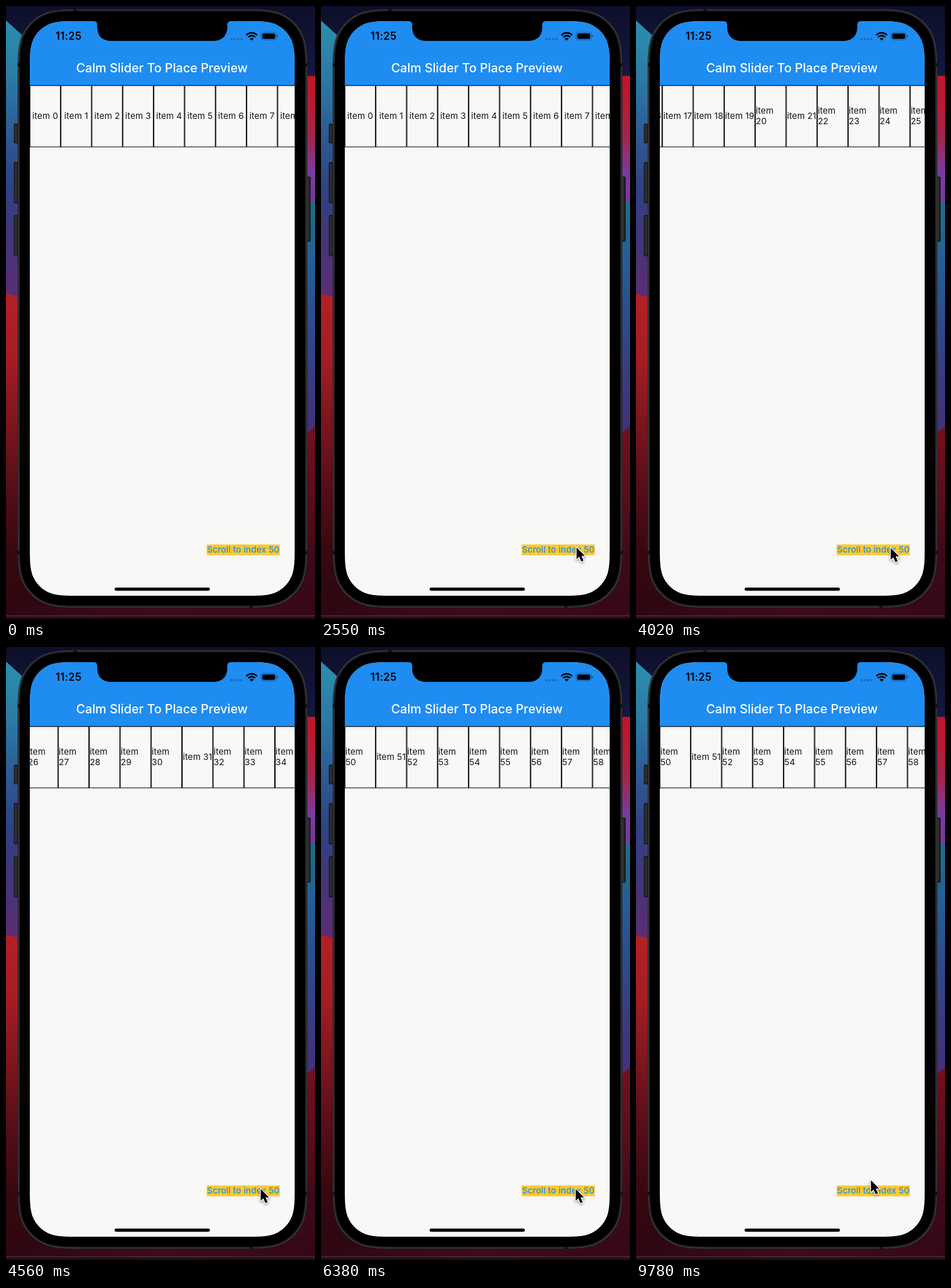
An HTML page with a canvas that plays this animation: 532 by 1053 pixels, repeating every 9.8 s.

```html
<!DOCTYPE html>
<html lang="en">
<head>
<meta charset="utf-8">
<title>List scroll demo</title>
<style>
html, body { margin: 0; width: 100%; height: 100%; overflow: hidden; background: #10112c; }
canvas { display: block; width: 532px; height: 1053px; }
</style>
</head>
<body>
<canvas id="stage" width="532" height="1053"></canvas>
<script>
const W = 532, H = 1053, LOOP = 9800;
const SCREEN = { x: 41, y: 26, w: 456, h: 987, r: 57 };
const ITEM_W = 53.33, ITEM_H = 106, LIST_Y = 136;
const INK = '#141414', BLUE = '#1e8cf1', PAPER = '#f8f8f6';
const FONT = 'Inter, Roboto, sans-serif';
const ctx = document.getElementById('stage').getContext('2d');

// [time, value...] keys
const SCROLL = [[3099, 0], [4560, 1391], [5260, 2102.2], [5853, 2666.5]];
const POINTER = [[560, 500, 1062], [1130, 440, 930], [2700, 440, 930], [2900, 438.5, 931],
  [9480, 438.5, 931], [9780, 404.5, 916]];

const clamp = (v, a = 0, b = 1) => Math.min(b, Math.max(a, v));
const ramp = (t, a, b) => clamp((t - a) / (b - a));
const smooth = u => u * u * (3 - 2 * u);

function keyed(keys, t, col, ease = u => u) {
  if (t <= keys[0][0]) return keys[0][col];
  for (let i = 1; i < keys.length; i++) {
    const a = keys[i - 1], b = keys[i];
    if (t <= b[0]) return a[col] + (b[col] - a[col]) * ease(ramp(t, a[0], b[0]));
  }
  return keys[keys.length - 1][col];
}

function sampled(t) {
  const phase = t < 3270 ? 30 : 80;
  const r = (((t - phase) % 140) + 140) % 140;
  const step = r < 20 ? 0 : r < 40 ? 1 : 2;
  return t - r + step * 140 / 3;
}

function box(x, y, w, h, r, fill) {
  ctx.beginPath();
  ctx.roundRect(x, y, w, h, r);
  ctx.fillStyle = fill;
  ctx.fill();
}

// Rectangle with continuous-curvature corners
function squircle(x, y, w, h, r) {
  const path = new Path2D();
  const corner = (cx, cy, ux, uy, vx, vy) => {
    const p = (a, b) => [cx + r * (a * ux + b * vx), cy + r * (a * uy + b * vy)];
    path.lineTo(...p(1.529, 0));
    path.bezierCurveTo(...p(1.088, 0), ...p(0.868, 0), ...p(0.631, 0.075));
    path.bezierCurveTo(...p(0.373, 0.169), ...p(0.169, 0.373), ...p(0.075, 0.631));
    path.bezierCurveTo(...p(0, 0.868), ...p(0, 1.088), ...p(0, 1.529));
  };
  corner(x, y, 0, 1, 1, 0);
  corner(x + w, y, -1, 0, 0, 1);
  corner(x + w, y + h, 0, -1, -1, 0);
  corner(x, y + h, 1, 0, 0, -1);
  path.closePath();
  return path;
}

function poly(points, fill) {
  ctx.beginPath();
  points.forEach(([x, y]) => ctx.lineTo(x, y));
  ctx.closePath();
  ctx.fillStyle = fill;
  ctx.fill();
}

function gradient(line, ...stops) {
  const g = ctx.createLinearGradient(...line);
  stops.forEach((c, i) => g.addColorStop(i / (stops.length - 1), c));
  return g;
}
const vertical = (y0, y1, ...stops) => gradient([0, y0, 0, y1], ...stops);

function text(str, x, y, size, weight, fill, align = 'left', spacing = 0) {
  ctx.font = `${weight} ${size}px ${FONT}`;
  ctx.letterSpacing = spacing + 'px';
  ctx.textAlign = align;
  ctx.fillStyle = fill;
  ctx.fillText(str, x, y);
}

function drawBackdrop() {
  ctx.fillStyle = vertical(0, 120, '#0d0f2a', '#151840');
  ctx.fillRect(0, 0, W, H);
  poly([[0, 25], [30, 52], [266, 300], [266, 620], [0, 620]],
    vertical(25, 500, '#2b8fae', '#2b7ba6', '#2d5c96', '#2f4283', '#443579', '#5d2c74'));
  poly([[0, 494], [30, 503], [266, 560], [266, H], [0, H]],
    vertical(494, 1046, '#b32024', '#a51d23', '#7d151d', '#560e18', '#38080f', '#2c0711'));
  ctx.fillStyle = vertical(120, 338, '#c21527', '#b81a35', '#a02650', '#7a3aa0', '#7b35a5');
  ctx.fillRect(266, 120, 266, 240);
  poly([[266, 352], [W, 337], [W, 800], [266, 800]],
    vertical(337, 735, '#1c6f86', '#235f96', '#2c4c8e', '#393b81', '#44307a'));
  poly([[266, 850], [515, 736], [W, 722], [W, H], [266, H]],
    vertical(722, 1046, '#74101e', '#5c0d1c', '#400a18', '#340816'));
  ctx.fillStyle = gradient([0, 0, W, 0], '#2e0712', '#400a19', '#360817');
  ctx.fillRect(0, 1030, W, 17);
  ctx.fillStyle = '#46424c';
  ctx.fillRect(0, 1047, W, 1.5);
  ctx.fillStyle = '#250a18';
  ctx.fillRect(0, 1048.5, W, 5);
}

function drawBody() {
  const key = (x, y, h) => {
    box(x, y, 8, h, 2, '#191a1c');
    box(x + 2, y + 2, 3, h - 4, 1, '#303235');
  };
  key(13.5, 202, 34);
  key(13.5, 268, 71);
  key(13.5, 359, 71);
  key(516.5, 293, 112);
  const rings = [[0, '#17181a'], [0.7, '#444547'], [1.8, '#202123'], [4, '#000']];
  rings.forEach(([inset, fill]) => {
    ctx.fillStyle = fill;
    ctx.fill(squircle(20 + inset, 5 + inset, 499 - 2 * inset, 1029 - 2 * inset, 78 - inset));
  });
  ctx.fillStyle = '#111';
  [98, 936].forEach(y => { ctx.fillRect(20, y, 4, 6); ctx.fillRect(515, y, 4, 6); });
  [[116, 5], [419, 1030]].forEach(([x, y]) => ctx.fillRect(x, y, 6, 4));
}

function drawHeader() {
  ctx.save();
  ctx.shadowColor = 'rgba(0,0,0,.3)';
  ctx.shadowBlur = 4;
  ctx.shadowOffsetY = 1;
  ctx.fillStyle = BLUE;
  ctx.fillRect(SCREEN.x - 10, SCREEN.y, SCREEN.w + 20, LIST_Y - SCREEN.y);
  ctx.restore();
  text('Calm Slider To Place Preview', 268.5, 113.6, 21.33, 500, '#fff', 'center');
}

function drawStatus() {
  text('11:25', 107.8, 58.4, 18, 600, '#000', 'center', 0.4);
  for (let i = 0; i < 4; i++) box(386.5 + i * 5.6, 55, 3.8, 3.8, 1.9, '#1868b5');
  // wireless fan
  ctx.save();
  ctx.beginPath();
  ctx.moveTo(423, 59.5);
  ctx.lineTo(409, 45.5);
  ctx.lineTo(409, 40);
  ctx.lineTo(437, 40);
  ctx.lineTo(437, 45.5);
  ctx.closePath();
  ctx.clip();
  ctx.strokeStyle = '#000';
  ctx.lineWidth = 2.7;
  [12.6, 8].forEach(r => {
    ctx.beginPath();
    ctx.arc(423, 58.8, r, 0, 7);
    ctx.stroke();
  });
  ctx.beginPath();
  ctx.arc(423, 58.8, 4.4, 0, 7);
  ctx.fillStyle = '#000';
  ctx.fill();
  ctx.restore();
  // battery
  ctx.beginPath();
  ctx.roundRect(439.3, 45.3, 26, 13, 4);
  ctx.strokeStyle = 'rgba(0,0,0,.38)';
  ctx.lineWidth = 1.1;
  ctx.stroke();
  box(441.2, 47.2, 22.2, 9.2, 2.3, '#000');
  box(466.6, 49.6, 1.7, 4.4, [0, 2, 2, 0], 'rgba(0,0,0,.45)');
}

function drawNotch() {
  ctx.beginPath();
  ctx.moveTo(151, 25);
  ctx.lineTo(151, 26);
  ctx.quadraticCurveTo(157, 26, 157, 32);
  ctx.lineTo(157, 36);
  ctx.bezierCurveTo(157, 51, 166, 60, 181, 60);
  ctx.lineTo(357, 60);
  ctx.bezierCurveTo(372, 60, 381, 51, 381, 36);
  ctx.lineTo(381, 32);
  ctx.quadraticCurveTo(381, 26, 387, 26);
  ctx.lineTo(387, 25);
  ctx.closePath();
  ctx.fillStyle = '#000';
  ctx.fill();
}

function drawList(offset) {
  const first = Math.max(0, Math.floor(offset / ITEM_W));
  const label = (str, x, y, align) => text(str, x, y, 14.93, 400, INK, align, 0.12);
  ctx.lineWidth = 1.1;
  for (let n = first; n < first + 10; n++) {
    const x = 40.8 + n * ITEM_W - offset;
    ctx.strokeStyle = '#000';
    ctx.strokeRect(x + 0.55, LIST_Y + 0.5, ITEM_W - 1.1, ITEM_H - 0.5);
    const oneLine = n < 20 || n % 10 === 1;
    if (oneLine) {
      label('item ' + n, x + ITEM_W / 2, 194.3, 'center');
    } else {
      label('item', x + 1.1, 185.3);
      label(n, x + 1.1, 203.3);
    }
  }
}

function drawButton(t) {
  const glow = ramp(t, 2950, 3010) * (1 - ramp(t, 3320, 3520));
  const ripple = ramp(t, 2950, 3010) * (1 - ramp(t, 3330, 3560));
  if (glow + ripple > 0) {
    ctx.save();
    ctx.beginPath();
    ctx.roundRect(343, 915, 137, 38, 4);
    ctx.clip();
    ctx.fillStyle = `rgba(33,150,243,${0.12 * glow})`;
    ctx.fillRect(343, 915, 137, 38);
    ctx.beginPath();
    ctx.arc(438.5, 931, 8 + 102 * ramp(t, 2950, 3320), 0, 7);
    ctx.fillStyle = `rgba(33,150,243,${0.12 * ripple})`;
    ctx.fill();
    ctx.restore();
  }
  ctx.fillStyle = '#fdc934';
  ctx.fillRect(345.5, 925, 126, 18.5);
  text('Scroll to index 50', 408.5, 939.3, 14.93, 500, '#2690d8', 'center', 0.08);
}

function drawPointer(t) {
  if (t < POINTER[0][0]) return;
  const x = keyed(POINTER, t, 1, smooth), y = keyed(POINTER, t, 2, smooth);
  ctx.save();
  ctx.translate(x, y);
  const arrow = new Path2D('M0 0V20.2L4.5 16L8.2 24.2L12 22.5L8.4 14.6H14.4Z');
  ctx.shadowColor = 'rgba(0,0,0,.4)';
  ctx.shadowBlur = 4;
  ctx.shadowOffsetY = 2;
  ctx.lineJoin = 'round';
  ctx.lineWidth = 2.8;
  ctx.strokeStyle = '#fff';
  ctx.stroke(arrow);
  ctx.shadowColor = 'transparent';
  ctx.fillStyle = '#000';
  ctx.fill(arrow);
  ctx.restore();
}

function draw(now) {
  const t = sampled(now % LOOP);
  drawBackdrop();
  drawBody();
  ctx.save();
  ctx.clip(squircle(SCREEN.x, SCREEN.y, SCREEN.w, SCREEN.h, SCREEN.r));
  ctx.fillStyle = PAPER;
  ctx.fillRect(SCREEN.x, SCREEN.y, SCREEN.w, SCREEN.h);
  drawList(keyed(SCROLL, t, 1));
  drawHeader();
  drawStatus();
  drawNotch();
  drawButton(t);
  box(187, 999, 164, 5.4, 2.7, '#000');
  ctx.restore();
  drawPointer(t);
}

function tick() {
  draw(performance.now());
  requestAnimationFrame(tick);
}
tick();
</script>
</body>
</html>
```
